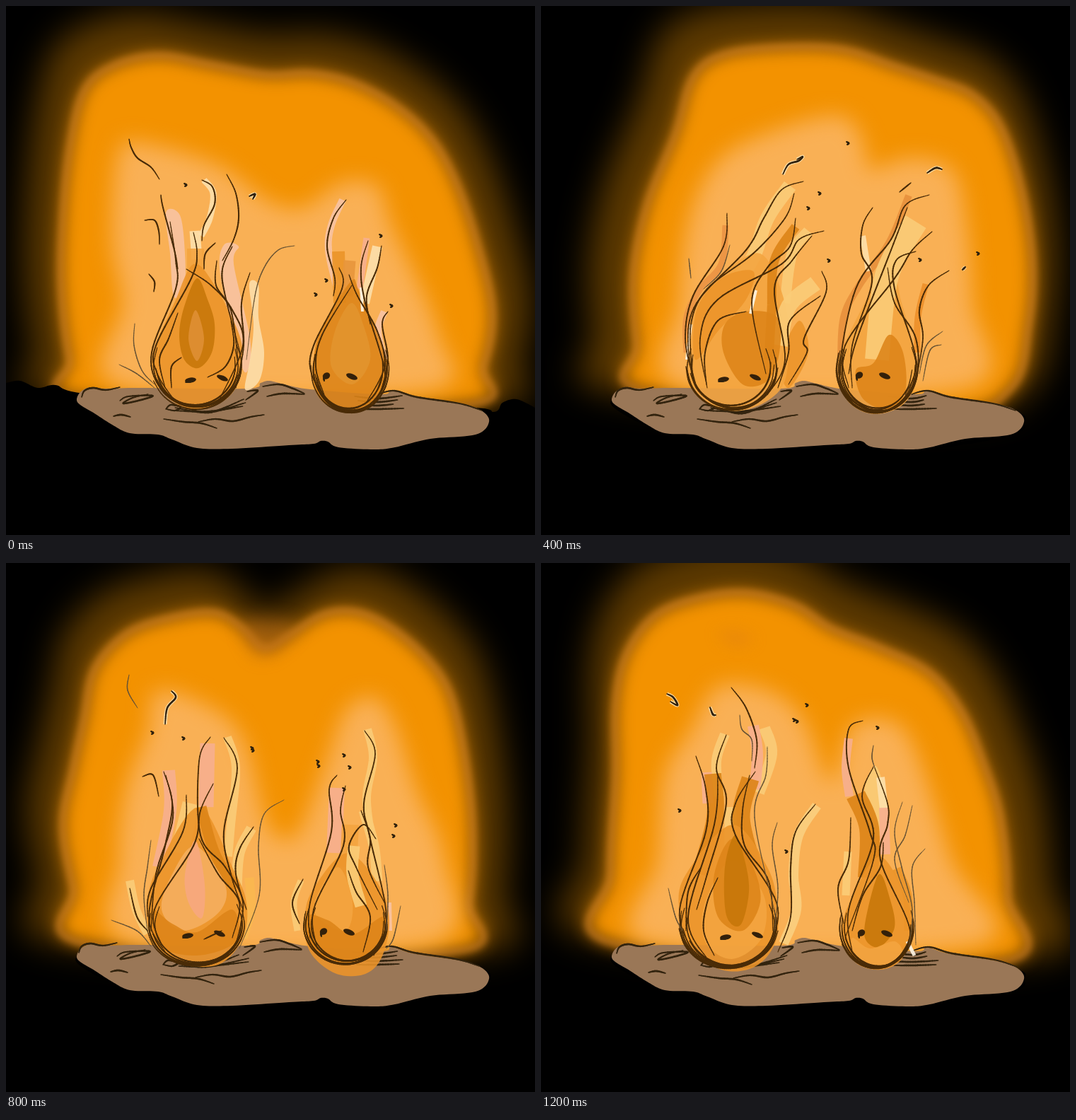
An HTML page with a canvas for the animation above (1.4 s loop, 748 by 748 pixels).

```html
<!DOCTYPE html>
<html lang="en">
<head>
<meta charset="utf-8">
<title>Two little flames</title>
<style>
html, body { margin: 0; width: 100%; height: 100%; overflow: hidden; background: #000; }
canvas { display: block; width: 100vw; height: 100vh; }
</style>
</head>
<body>
<canvas id="stage" width="748" height="748"></canvas>
<script>
const SIZE = 748, HOLD = 200;
const PINK = '#f8b090', PALE = '#f9c4a4', CREAM = '#fde0ac', YELLOW = '#fbcd78', WHITE = '#fff6e6';
const AMBER = '#f4a540', ORANGE = '#ec952a', RUST = '#dd8418', DEEP = '#c77708';
let g, seed;

const rnd = () => (seed = (seed * 16807) % 2147483647) / 2147483647;
const jit = a => (rnd() * 2 - 1) * a;

// Catmull-Rom samples through x,y pairs
function curve(c, closed) {
  const n = c.length / 2, out = [];
  const at = i => {
    i = closed ? (i + n) % n : Math.max(0, Math.min(n - 1, i));
    return [c[2 * i], c[2 * i + 1]];
  };
  for (let i = 0; i < (closed ? n : n - 1); i++) {
    const [a, b, d, e] = [at(i - 1), at(i), at(i + 1), at(i + 2)];
    for (let t = 0; t < 0.99; t += 0.1) {
      out.push([0, 1].map(k => b[k] + t / 2 * (d[k] - a[k] +
        t * (2 * a[k] - 5 * b[k] + 4 * d[k] - e[k] + t * (3 * (b[k] - d[k]) + e[k] - a[k])))));
    }
  }
  if (!closed) out.push(at(n - 1));
  return out;
}

function trace(c, closed) {
  g.beginPath();
  curve(c, closed).forEach(p => g.lineTo(...p));
  if (closed) g.closePath();
}

function fill(color, ...c) {
  trace(c, true);
  g.globalAlpha = 0.88;
  g.fillStyle = color;
  g.fill();
  g.globalAlpha = 1;
}

function band(color, w, ...c) {
  trace(c);
  g.globalAlpha = 0.9;
  g.lineCap = 'butt';
  g.lineWidth = w;
  g.strokeStyle = color;
  g.stroke();
  g.globalAlpha = 1;
}

// tapered pen line
const pen = (color, w) => (...c) => {
  const p = curve(c);
  g.lineCap = 'round';
  g.strokeStyle = color;
  for (let i = 1; i < p.length; i++) {
    g.lineWidth = w * (0.5 + 0.5 * Math.sin(Math.PI * i / p.length));
    g.beginPath();
    g.moveTo(...p[i - 1]);
    g.lineTo(...p[i]);
    g.stroke();
  }
};
const ink = pen('#4a2c08', 2.1), thin = pen('#685334', 1.5), mark = pen('#33240f', 2.6);

function dots(...c) {
  for (let i = 0; i < c.length; i += 2) mark(c[i] - 1, c[i + 1] - 2, c[i] + 2, c[i + 1], c[i], c[i + 1] + 2);
}

function spark(...c) {
  band(CREAM, 5, ...c);
  mark(...c);
}

// scribbled bowl at the foot of a flame
function nest(x, y, rx, ry) {
  for (let i = 0; i < 7; i++) {
    const from = jit(0.5), to = Math.PI + jit(0.5), ox = jit(4), k = 1 + jit(0.06), c = [];
    for (let s = 0; s <= 8; s++) {
      const a = from + (to - from) * s / 8;
      c.push(x + ox + Math.cos(a) * rx * k, y + Math.sin(a) * ry * k);
    }
    ink(...c);
  }
}

function soft(blur, color, c, line) {
  g.filter = `blur(${blur}px)`;
  trace(c, true);
  g.fillStyle = g.strokeStyle = color;
  g.lineWidth = line;
  if (line) g.stroke();
  else g.fill();
  g.filter = 'none';
}

// the haze is the glow, grown from the ground and drifting by dx, dy
function backdrop(dx, dy, glow, light) {
  soft(24, '#5c3900', glow.map((v, i) => i % 2 ? 560 + (v - 560) * 1.12 + dy : 375 + (v - 375) * 1.17 + dx));
  soft(13, '#f39200', glow);
  soft(5, 'rgba(214,132,44,.6)', glow, 8);
  soft(15, '#f9b055', light);
}

function rock(dx, dy) {
  fill('#000', 98,560,160,552,300,550,640,570,684,590,660,609,550,627,480,631,360,628,250,622,150,594);
  trace([100,556,106,545,120,539,140,541,190,540,340,541,360,533,372,530,390,534,430,542,530,549,545,543,575,552,
    640,562,672,572,683,588,664,606,600,612,550,624,520,627,470,624,455,616,445,615,435,619,400,621,320,626,
    270,625,235,613,215,606,175,604,150,592,125,576,105,564], true);
  g.fillStyle = '#9a7757';
  g.fill();
  g.save();
  g.translate(dx, dy);
  mark(106,553,110,544,122,540,140,543,160,539);
  mark(160,558,172,552,206,551,190,557,165,562,178,554,200,549);
  mark(151,580,162,578,175,581);
  mark(222,584,250,588,275,590,297,597);
  mark(271,588,295,584,320,587,345,581,364,578);
  mark(225,570,232,564,246,567,238,572,226,570);
  mark(362,538,385,535,405,541,421,548);
  mark(368,552,390,548,421,549);
  mark(340,545,355,544,338,557);
  mark(525,549,548,544,580,553,640,562,672,572);
  for (let i = 0; i < 4; i++) mark(500 + jit(8), 552 + 6 * i, 525, 555 + 5 * i, 553 + jit(12), 551 + 6 * i);
  for (let i = 0; i < 3; i++) mark(240 + jit(8), 564 + 4 * i, 285, 574 + jit(3), 340 + jit(8), 556 + 5 * i);
  g.restore();
}

function eyes(dx, dy) {
  g.fillStyle = '#33200a';
  [[261, 528, 8, 3.6, -0.15], [306, 525, 8.5, 3.4, 0.4], [453, 522, 5.5, 4.5, -0.6], [489, 523, 8.5, 3.8, 0.4]]
    .forEach(([x, y, ...shape]) => {
      g.beginPath();
      g.ellipse(x + dx, y + dy, ...shape, 0, 7);
      g.fill();
    });
  mark(254 + dx, 531 + dy, 263 + dx, 530 + dy);
  mark(449 + dx, 523 + dy, 450 + dx, 529 + dy);
}

const scenes = [() => {
  backdrop(0, 0,
    [115,555,90,500,78,400,80,300,90,200,110,120,150,85,215,70,290,83,370,97,430,95,490,108,550,140,600,185,635,245,665,330,688,430,675,510,640,565],
    [165,540,165,420,150,330,160,205,200,195,300,225,370,275,420,285,475,250,525,255,545,310,610,460,595,545]);
  g.fillStyle = '#000';
  trace([0,533,20,530,45,540,70,536,110,548,300,565,640,567,690,574,702,561,722,556,748,568]);
  g.lineTo(SIZE, SIZE);
  g.lineTo(0, SIZE);
  g.fill();
  rock(1, 0);
  fill(PALE, 226,292,246,296,253,350,252,400,237,410,232,350);
  fill(PALE, 308,338,329,340,322,365,345,470,342,515,330,500,303,380);
  fill(CREAM, 344,393,357,395,357,440,365,490,358,530,338,542,345,500,350,450);
  band(CREAM, 15, 267,318,270,358);
  band(CREAM, 9, 280,246,293,265,288,300,276,325);
  band(AMBER, 24, 268,343,268,410);
  fill(ORANGE, 265,365,238,420,208,490,212,525,230,555,265,570,300,563,325,540,333,505,330,465,295,395);
  fill(DEEP, 270,385,252,425,245,465,252,500,272,512,291,490,295,450,285,415);
  fill('#e09035', 268,430,258,470,270,502,280,470);
  nest(269, 507, 61, 60);
  ink(174,188,177,200,186,215,205,228,217,245);
  ink(219,267,222,285,238,345,243,372);
  ink(196,303,210,303,216,318,217,337);
  ink(202,379,210,390,209,404);
  ink(277,246,292,256,295,280,280,310,277,332);
  ink(312,238,325,265,329,300,322,330,306,360);
  thin(408,339,385,345,365,370,352,410,340,500);
  ink(320,340,306,372,310,410,331,490);
  ink(232,305,240,360,240,400,206,490,218,540,255,565);
  ink(265,320,270,350,262,385,212,480,214,520,240,560);
  ink(255,372,290,395,320,430,335,480,300,560);
  ink(296,335,282,350,280,372);
  ink(298,360,297,395,318,430,328,500);
  ink(243,434,230,470,217,500,225,540);
  ink(318,445,322,480,310,510,285,525);
  ink(345,377,333,420,336,480,325,540);
  ink(234,540,234,510,248,497);
  thin(182,449,181,480,192,515,210,535);
  thin(160,507,185,520,210,540);
  spark(344,269,352,266,349,273);
  band(PALE, 10, 476,274,460,310,456,345,467,395);
  band(PINK, 9, 510,328,500,400);
  band(CREAM, 14, 525,340,507,420);
  band(PALE, 10, 535,432,526,460,535,500);
  band(ORANGE, 18, 470,347,472,420);
  band('#e8963c', 17, 486,360,482,410);
  fill(RUST, 487,390,445,460,435,500,436,540,455,565,490,572,520,560,538,525,535,490,500,405);
  fill('#e3942e', 488,420,465,460,460,510,490,535,515,500,505,450);
  band(WHITE, 4, 502,398,504,432);
  nest(486, 512, 51, 60);
  ink(481,274,463,300,454,340,465,385,463,410);
  ink(471,370,475,400,435,480,432,520,455,560);
  ink(489,395,447,465,438,510,450,550);
  ink(512,332,502,370,508,420,536,520,520,560);
  ink(531,339,525,370,510,410,515,450);
  ink(540,432,532,450,540,500,530,545);
  ink(485,380,497,410,525,460,535,510,510,560);
  dots(253,253,437,408,452,388,529,325,544,424);
  eyes(0, 1);
}, () => {
  backdrop(10, 0,
    [125,540,95,480,85,400,95,280,110,190,140,130,200,98,270,88,330,70,390,65,440,75,500,110,550,160,600,215,630,280,635,380,630,470,605,555],
    [195,540,200,400,185,290,190,205,260,195,350,205,400,245,450,300,520,290,550,310,545,400,535,545]);
  rock(-1, 0);
  band(PALE, 19, 365,265,352,294);
  band(YELLOW, 20, 352,292,325,340);
  band(PALE, 6, 398,320,370,337,348,358);
  band(PALE, 6, 267,290,262,345);
  band(AMBER, 24, 370,358,358,420,340,530);
  band(YELLOW, 14, 372,358,362,385);
  band(ORANGE, 11, 391,380,372,416);
  fill(AMBER, 290,345,240,390,215,450,208,500,220,545,260,570,300,570,335,545,345,500,325,380);
  band(RUST, 17, 326,348,280,367,235,412,214,470);
  band(ORANGE, 14, 335,365,300,375,260,410);
  fill('#f7ba58', 290,400,252,450,248,495,275,515,315,490,325,430);
  fill(RUST, 215,500,238,495,255,530,320,528,300,560,250,562,222,540);
  nest(271, 508, 64, 60);
  thin(173,170,167,180,180,200,210,215,222,232);
  thin(277,180,290,210,295,240,285,290,282,330);
  ink(262,208,278,240,285,290,280,340,250,370);
  ink(361,182,320,205,290,250,258,370,262,420,232,470);
  ink(352,228,322,255,308,300,312,350,325,400);
  ink(180,281,200,279,230,300,250,345,275,400,328,470);
  ink(232,316,233,370,205,470,208,520,235,560);
  thin(184,300,205,345,214,395,198,490,210,525);
  ink(268,340,260,380,208,480,215,530);
  ink(330,285,305,330,290,380,335,470,332,530);
  ink(305,330,320,380,340,500,325,545);
  ink(350,362,340,395,345,450,320,550);
  ink(355,439,347,445,352,453);
  thin(182,458,188,490,210,530);
  ink(316,475,312,505,286,527);
  ink(242,495,226,510,230,540);
  spark(316,196,318,185,325,184,321,194);
  band('#f8b85c', 22, 510,297,494,355);
  band(PALE, 15, 474,360,482,410);
  band(WHITE, 7, 501,358,504,390);
  band(PINK, 18, 498,385,497,430);
  fill(ORANGE, 485,395,435,475,425,515,435,550,470,572,505,562,530,525,530,480,510,425);
  fill(AMBER, 487,420,470,470,488,520,503,470);
  fill(RUST, 430,500,460,505,490,535,520,510,515,550,470,566,435,545);
  nest(479, 512, 52, 58);
  thin(470,208,468,230,450,260,442,280);
  thin(456,260,459,250,466,252,467,260);
  thin(578,245,578,280,560,320,530,360,515,400);
  ink(469,284,458,320,458,370,468,410);
  ink(528,304,502,322,490,360,485,400);
  ink(505,315,488,345,480,385,435,475,428,520);
  ink(502,335,505,370,483,410,440,530);
  ink(526,342,510,380,522,440,530,500,515,555);
  ink(475,380,510,425,533,480,528,535);
  ink(425,383,435,382,441,398);
  thin(448,400,445,430,430,470);
  spark(524,260,524,249,531,253);
  dots(247,248,238,207,181,282,327,492,437,293,436,320,511,266);
  eyes(-2, -1);
}, () => {
  backdrop(-20, 0,
    [150,545,135,480,130,380,150,280,190,180,215,100,260,68,350,58,430,62,500,85,560,105,610,125,650,170,680,260,695,360,690,450,665,540,560,575],
    [200,540,195,420,210,300,250,220,320,180,420,155,455,190,465,230,520,215,580,230,600,300,610,420,605,540]);
  rock(-1, 0);
  band('#ec9444', 9, 261,310,255,365,225,400,206,440,206,490);
  fill(ORANGE, 365,445,378,490,350,540,338,500);
  band(YELLOW, 20, 352,254,320,300,300,355,270,400);
  band(YELLOW, 15, 378,318,355,350,345,420);
  fill(AMBER, 310,350,250,385,215,430,205,490,215,540,255,570,300,568,340,540,350,490,345,420);
  band(YELLOW, 22, 388,392,350,425,338,480);
  fill(ORANGE, 300,375,255,385,220,430,218,500,250,460,290,415);
  fill(RUST, 290,432,260,450,258,490,285,535,320,530,337,490,334,440);
  band(RUST, 13, 360,312,330,360,326,430,322,500);
  band(WHITE, 4, 212,450,206,500);
  band(WHITE, 4, 304,402,296,435);
  nest(271, 510, 60, 58);
  ink(371,248,340,260,315,300,290,345,220,420,208,480,220,540);
  ink(358,265,345,300,300,350,235,400,212,450,214,520);
  ink(400,318,365,330,340,365,250,415,225,470,235,540);
  ink(360,300,352,340,320,370,298,420,318,520);
  ink(383,325,355,360,330,400,345,500,320,550);
  ink(263,293,258,340,215,410,204,470,215,525);
  ink(397,375,403,405,372,470,376,490,350,535);
  ink(395,410,352,445,350,490,335,540);
  ink(290,432,250,445,232,490,234,535);
  thin(209,357,212,385);
  thin(267,338,255,375,230,400);
  spark(362,217,370,213,364,219,350,224,342,238);
  spark(567,231,558,229,546,236);
  spark(600,369,596,373);
  ink(523,250,507,263);
  band('#e8913c', 10, 520,268,492,335,450,395,428,440,424,500);
  band(CREAM, 8, 455,325,463,375);
  band('#ee8f2a', 9, 544,393,533,440,532,490);
  fill(AMBER, 490,370,430,475,420,520,435,560,470,577,510,565,530,530,525,480,510,420);
  band(YELLOW, 34, 530,305,500,355,485,400,475,500);
  fill(RUST, 492,465,470,505,445,515,455,555,490,570,515,545,512,490);
  nest(476, 512, 53, 60);
  ink(469,285,455,310,453,350,468,390,440,480,440,540);
  ink(549,267,515,282,495,330,445,400,422,520,440,560);
  ink(553,319,525,345,500,385,430,480,435,540);
  ink(530,347,502,360,500,400,530,500,515,550);
  ink(490,370,500,420,530,470,530,530,500,570);
  ink(577,374,548,395,535,430,540,470,530,530);
  ink(518,285,495,345,447,470,435,520);
  thin(568,460,545,480,535,520);
  thin(566,479,550,487,540,530);
  dots(433,194,393,265,377,286,406,360,535,359,617,350);
  eyes(-3, 0);
}, () => {
  backdrop(-20, -5,
    [135,535,125,480,145,390,155,290,190,220,250,165,330,105,400,55,470,38,540,42,610,60,640,110,665,180,685,260,690,400,670,480,640,550],
    [195,540,195,420,210,290,260,240,330,200,400,165,470,150,520,180,545,270,600,320,605,420,590,540]);
  rock(-2, -3);
  band('#f8a87c', 20, 262,330,232,375,220,430,222,480);
  band(YELLOW, 15, 396,250,340,268,300,312,285,370);
  band(YELLOW, 20, 385,318,362,350,355,420,352,530);
  band(YELLOW, 18, 345,320,330,350,325,420);
  fill(AMBER, 290,335,262,370,235,430,215,490,215,530,245,560,300,566,340,545,348,490,345,400,320,380);
  fill(ORANGE, 268,345,245,420,228,480,245,520,300,510,285,440,282,370);
  band(YELLOW, 27, 302,320,293,420,302,500);
  band(ORANGE, 16, 318,380,320,440,332,500);
  band(WHITE, 6, 212,490,214,520,225,545);
  nest(278, 508, 62, 57);
  ink(400,248,360,255,320,290,290,340,275,400,218,500,240,555);
  ink(432,287,390,297,350,345,315,400,270,418,220,490);
  ink(395,336,368,350,352,400,345,520);
  ink(350,316,325,345,315,385,342,490,335,540);
  ink(261,313,268,340,230,410,238,440,222,490);
  ink(278,298,275,318,262,325);
  ink(322,265,285,310,280,360,225,460,222,510);
  ink(380,320,358,370,348,450,340,530);
  ink(257,470,235,490,228,520,245,555);
  spark(205,405,198,420,200,440);
  ink(470,285,455,286,441,297);
  spark(590,374,582,376,571,383);
  band('#f2a070', 8, 426,440,417,490,424,540);
  fill(ORANGE, 520,345,450,430,430,480,425,520,440,555,480,572,520,560,535,520,537,460,533,390);
  fill('#f8a87c', 530,306,548,307,547,330,530,365,515,352);
  fill(RUST, 522,355,480,400,450,450,445,490,470,505,485,460,515,410);
  fill('#f7b550', 510,430,484,475,486,515,515,535,528,480);
  nest(483, 512, 53, 58);
  ink(528,307,520,345,455,410,432,460,428,510,445,555);
  ink(546,328,525,370,515,460,500,540);
  ink(525,345,490,405,435,500,440,545);
  thin(574,349,548,365,535,410,515,450,530,500,515,555);
  ink(505,385,515,440,530,480,525,540);
  ink(480,400,455,435,438,490);
  ink(545,403,520,430);
  ink(560,434,545,470,542,510,530,550);
  thin(568,472,545,492);
  dots(383,259,360,278,367,349,251,373,257,355,489,346,557,299,567,294);
  eyes(-3, -1);
}, () => {
  backdrop(0, 0,
    [120,540,95,460,80,370,95,290,110,220,125,150,170,100,230,78,295,70,335,92,365,120,400,102,450,72,500,70,550,95,600,140,630,190,650,280,660,380,655,480,630,550],
    [180,540,160,420,170,320,200,240,215,180,300,210,340,260,370,370,410,385,450,290,480,210,520,190,550,230,580,320,620,420,600,540]);
  soft(12, 'rgba(190,110,20,.6)', [335,85,365,80,410,88,385,120,355,130]);
  rock(-3, -2);
  band(PINK, 21, 285,255,283,345);
  band(PINK, 18, 230,293,232,350,216,430);
  band(YELLOW, 12, 313,246,325,290,318,370,314,415);
  band(YELLOW, 15, 347,375,330,410,326,460);
  band(YELLOW, 12, 175,449,184,490,200,524);
  band('#fbb850', 13, 344,445,346,490,335,530);
  band(YELLOW, 25, 262,340,245,410);
  fill(ORANGE, 272,345,215,430,200,480,205,530,240,565,300,568,335,530,340,480,320,430);
  fill('#f5b060', 268,400,235,440,220,490,250,520,300,495,310,455);
  fill('#f8a880', 268,392,253,440,258,480,277,502,281,455);
  band(RUST, 15, 276,345,295,410,325,460);
  fill(RUST, 206,490,235,510,270,522,320,490,325,535,270,555,215,540);
  nest(269, 510, 66, 58);
  thin(174,158,172,180,186,205);
  ink(193,302,208,300,216,330);
  ink(289,246,273,280,275,385,310,430,335,480,325,540);
  ink(223,295,235,340,225,400,202,500,225,550);
  ink(226,300,236,360,212,440,205,520);
  ink(308,247,327,290,308,380,318,440,335,490);
  ink(293,312,275,350,265,400,210,490,220,540);
  ink(350,373,330,405,325,440,340,490);
  thin(393,335,365,355,357,400,358,470,330,545);
  ink(255,328,250,380,205,460,200,500);
  thin(205,392,200,430,195,470,200,520);
  ink(175,460,185,500,200,520);
  thin(149,505,185,520,205,542);
  ink(273,390,300,440,330,480,320,530);
  ink(305,520,280,532);
  spark(234,181,240,190,228,205,225,228);
  band(PINK, 22, 468,318,464,410);
  band(YELLOW, 12, 511,235,519,275,510,330,515,380);
  band(YELLOW, 15, 506,350,520,400,525,450);
  band(AMBER, 24, 487,370,484,430);
  band(YELLOW, 9, 417,449,407,480,412,520);
  band(PALE, 8, 541,480,542,520);
  fill(ORANGE, 483,410,435,460,422,505,430,550,465,580,505,582,530,560,542,510,530,460);
  band(YELLOW, 17, 492,400,490,440,502,485);
  fill(AMBER, 470,430,440,470,440,500,480,520,490,480);
  fill(RUST, 425,500,455,505,490,525,535,500,525,550,480,566,435,550);
  nest(481, 511, 56, 54);
  ink(507,237,522,270,506,340,515,390,538,500,520,555);
  ink(468,300,457,320,460,380,430,480,430,530);
  ink(480,315,473,350,477,400,435,490,440,545);
  ink(502,350,515,390,512,430,535,480);
  ink(523,390,505,370,485,400,495,430,525,490);
  ink(420,447,405,480,415,510);
  thin(535,427,540,470,538,520);
  ink(484,435,495,465,515,500,505,550);
  thin(558,485,548,530,538,545);
  dots(250,248,206,240,347,262,348,265,440,281,441,287,477,272,485,289,550,371,547,386,477,320);
  eyes(-4, -1);
}, () => {
  backdrop(0, 0,
    [125,540,105,460,90,360,105,250,130,150,170,90,230,75,310,83,365,90,410,65,460,55,530,72,590,115,630,180,665,260,682,350,665,450,640,555],
    [200,540,170,420,180,260,205,155,290,185,350,250,400,360,440,300,480,230,520,180,545,250,580,380,590,540]);
  rock(0, 0);
  band(YELLOW, 13, 216,253,226,320);
  band(PINK, 16, 240,288,232,360);
  band(PINK, 24, 268,289,255,345);
  band(PALE, 20, 316,278,298,370);
  band(CREAM, 15, 294,292,285,385);
  band(PALE, 22, 332,400,325,470);
  band(PINK, 15, 175,448,186,500);
  band(CREAM, 9, 180,495,212,537);
  band(CREAM, 6, 360,403,352,450,342,520);
  band(AMBER, 34, 242,320,238,420);
  fill(ORANGE, 262,345,215,430,200,490,215,545,260,570,305,568,335,530,337,480,315,430);
  fill('#d98820', 272,420,250,450,258,480,290,500,305,470,290,430);
  fill('#e89740', 262,440,240,475,260,510,300,505,285,460);
  band(RUST, 10, 258,395,262,430);
  nest(268, 508, 65, 57);
  ink(193,168,181,180,205,205,230,240);
  thin(304,184,308,200,298,225,297,250);
  ink(285,258,287,290,262,335,275,390,335,490,320,545);
  ink(216,255,230,310,230,370,200,490,220,545);
  ink(323,275,320,330,305,370,308,400);
  ink(250,323,235,390,210,480,230,550);
  ink(299,297,280,360,285,395);
  ink(202,370,208,420,203,480,212,520);
  ink(348,360,325,395,320,440);
  thin(365,398,352,430,358,480,340,530);
  ink(172,455,180,500,205,530);
  ink(255,340,245,390,215,440,208,500);
  ink(249,443,230,475,218,510,235,550);
  ink(265,380,300,420,325,465,330,520);
  spark(258,222,262,227,262,233);
  band(YELLOW, 19, 467,278,466,340,462,445);
  band(PINK, 9, 486,277,484,350);
  band(ORANGE, 22, 486,345,487,440);
  band(AMBER, 22, 500,372,500,440);
  band(PINK, 10, 422,368,436,410,430,470);
  band(CREAM, 7, 551,340,535,378,524,405);
  band(WHITE, 7, 526,393,520,440);
  fill(ORANGE, 488,410,435,470,425,515,440,560,485,572,515,560,528,510,515,460);
  fill('#f0a250', 482,440,445,475,450,525,490,535,508,500,500,460);
  fill(RUST, 470,450,445,490,465,520,490,490);
  band(WHITE, 3, 533,500,528,545);
  nest(477, 512, 49, 56);
  band(CREAM, 5, 462,222,440,258,431,305);
  ink(465,168,474,195,462,220,440,260,429,312);
  ink(473,278,457,330,463,390,428,490,430,540);
  ink(490,275,480,330,475,380,515,470,525,530);
  thin(547,272,555,310,550,350,522,395,518,450,535,510);
  ink(419,363,440,410,435,470,425,510);
  ink(500,350,490,400,500,440,525,500,510,555);
  ink(487,370,470,430,440,470,430,520);
  thin(543,457,535,490,530,550);
  ink(466,552,485,557,507,545,513,515);
  dots(211,359,343,257,348,326,284,260,521,367,475,355,457,226);
  eyes(-2, 1);
}, () => {
  backdrop(10, -8,
    [110,540,98,440,105,300,105,200,120,130,160,75,220,50,290,42,360,60,410,92,480,120,550,155,595,210,625,280,650,360,660,470,645,565],
    [155,540,165,420,175,300,210,240,250,175,320,180,370,220,410,310,440,230,500,225,535,280,580,420,620,540]);
  soft(10, 'rgba(225,130,20,.45)', [250,100,275,95,300,108,275,118]);
  rock(1, -1);
  band(YELLOW, 14, 260,242,248,280,252,330);
  band(YELLOW, 16, 316,233,326,270,308,325);
  band(PINK, 16, 300,230,306,270,302,320);
  band(PINK, 15, 234,296,236,340);
  band(YELLOW, 17, 268,345,268,400);
  band('#fbd080', 14, 390,343,364,385,357,440,361,490,343,538);
  band(RUST, 24, 243,298,246,360,225,440);
  band(RUST, 25, 296,305,283,360,300,430);
  fill(ORANGE, 270,370,205,440,195,490,210,545,255,575,300,572,330,540,335,490,320,430);
  fill(AMBER, 270,420,232,480,232,535,270,560,312,530,315,470);
  fill(RUST, 270,390,245,440,250,500,285,520,310,480,300,430);
  fill(DEEP, 274,385,260,430,262,498,282,512,294,465,288,420);
  nest(267, 510, 66, 60);
  ink(269,176,290,205,305,250,302,290);
  thin(281,215,284,235,298,250,298,280);
  ink(262,243,248,290,262,340,235,440,220,490);
  ink(219,273,233,320,233,380,196,490,215,550);
  ink(303,295,275,340,275,385,333,480,325,540);
  ink(250,300,245,370,208,500,235,560);
  ink(295,300,285,350,288,400,322,450,328,520);
  thin(320,260,318,300,302,360,332,500);
  thin(334,367,327,400,335,460,330,520);
  ink(388,341,360,380,353,430,353,500,335,550);
  thin(180,460,190,500,200,520);
  ink(250,445,235,480,230,520,245,555);
  ink(225,432,208,465,205,520);
  spark(178,185,187,190,193,201,183,196);
  spark(239,204,243,214,247,215);
  band(PINK, 12, 435,248,431,290,436,330);
  fill(YELLOW, 470,288,457,325,465,380,490,380,491,345,480,300);
  band(CREAM, 12, 480,303,485,348);
  band(PINK, 14, 485,346,487,412);
  band(YELLOW, 11, 434,408,431,470);
  band(ORANGE, 13, 503,432,518,470,520,520);
  band(RUST, 28, 445,328,464,375,462,445);
  fill(ORANGE, 478,415,432,490,428,530,445,565,480,575,510,560,522,520,518,480);
  fill(DEEP, 478,440,462,490,458,530,478,543,500,515,492,470);
  fill(AMBER, 440,530,465,545,500,535,510,555,475,570,445,558);
  band(WHITE, 5, 518,535,528,555);
  nest(475, 514, 50, 57);
  ink(455,223,435,235,435,290,465,380,470,420,430,530);
  thin(470,258,468,275,472,290);
  ink(472,290,490,340,490,370,480,420,522,520,500,565);
  ink(470,288,454,330,470,390,435,490,440,550);
  thin(511,338,500,380,510,430,525,490,520,545);
  thin(525,343,515,385,500,420,520,480);
  thin(543,404,525,430,528,480,530,540);
  ink(438,360,435,420,420,460,428,510);
  ink(484,395,480,430,455,470,440,520);
  dots(195,350,346,408,357,222,361,224,375,201,475,233);
  eyes(0, 1);
}];

const sheets = scenes.map((draw, i) => {
  const sheet = document.createElement('canvas');
  sheet.width = sheet.height = SIZE;
  g = sheet.getContext('2d');
  g.lineJoin = 'round';
  g.fillRect(0, 0, SIZE, SIZE);
  seed = 97 + i * 1009;
  draw();
  return sheet;
});

const view = document.getElementById('stage').getContext('2d');
const start = performance.now();
function tick() {
  const i = Math.floor((performance.now() - start) / HOLD) % sheets.length;
  view.drawImage(sheets[i], 0, 0);
  requestAnimationFrame(tick);
}
tick();
</script>
</body>
</html>
```
